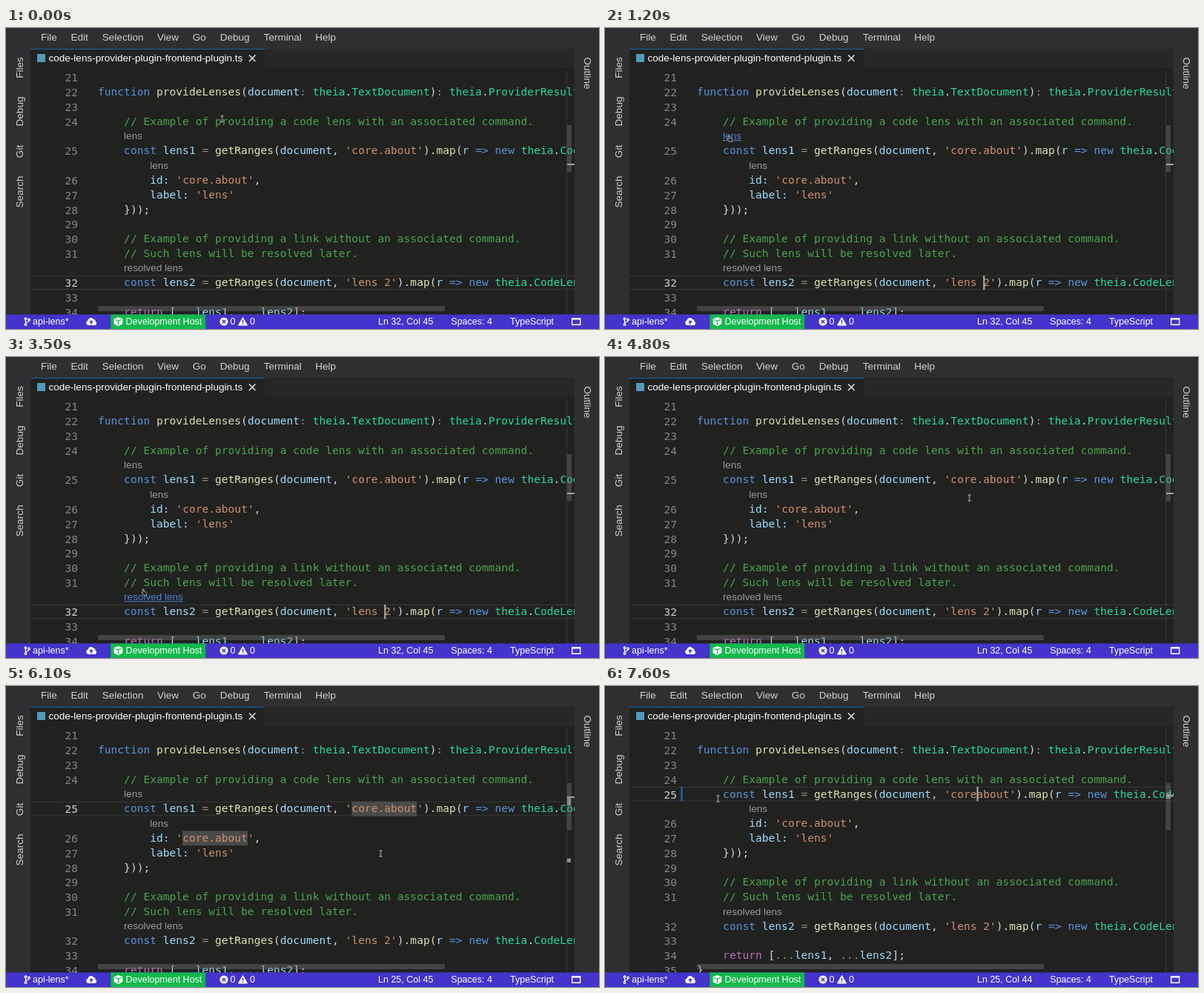
Write an HTML page that moves like this. It is 800 px wide and 406 px high and loops after 8000 ms.

```html
<!DOCTYPE html>
<html lang="en">
<head>
<meta charset="utf-8">
<title>Code lens demo</title>
<style>
html, body { margin: 0; width: 100%; height: 100%; overflow: hidden; background: #2f2e30; }
svg { display: block; width: 800px; height: 406px; }
text { white-space: pre; font: 13.54px "Liberation Sans", Arial, sans-serif; fill: #d2d2d2; }
.code text { font: 14.583px "DejaVu Sans Mono", monospace; fill: #d4d4d4; }
.code .num { fill: #858585; }
.code .lens text { font: 13.54px "Liberation Sans", Arial, sans-serif; fill: currentColor; }
.status text { font-size: 12.5px; fill: #fff; }
.comment { fill: #49a44c; }
.string { fill: #ce8f6e; }
.keyword { fill: #5893dc; }
.control { fill: #bb70c0; }
.type { fill: #26d8a4; }
.func { fill: #dce2b0; }
.dim { fill: #8c8c8c; }
.name { fill: #9cdcfe; }

.lens { color: #999; stroke-opacity: 0; }
.lens line { stroke: currentColor; }

/* 8 s timeline: 68.75% click, 72.5% word highlights, 82.5% deletion, 85% lens removed */
.pre, .mid, .post, .words, .ibeam, .hand, .gone, .collapse, .shift, .lens, .mouse,
.code .on25, .code .on32 { animation: 8s step-end infinite; }
.pre { animation-name: pre; }
.mid { animation-name: mid; }
.post { animation-name: post; }
.words { animation-name: words; }
.gone { animation-name: gone; }
.collapse { animation-name: collapse; }
.shift { animation-name: shift; }
.code .on25 { animation-name: on25; }
.code .on32 { animation-name: on32; }
.ibeam { animation-name: ibeam; }
.hand { animation-name: hand; }
.lensA { animation-name: hoverA; }
.lensB { animation-name: hoverB; }
.lensC { animation-name: hoverC; }
.mouse { animation-name: mouse; animation-timing-function: linear; }
.blink { animation: blink 1s step-end infinite; }
.clicked { animation-delay: -.7s; }
.edited { animation-delay: -.6s; }

@keyframes pre { 0% { opacity: 1 } 68.75%, 100% { opacity: 0 } }
@keyframes mid { 0% { opacity: 0 } 68.75% { opacity: 1 } 82.5%, 100% { opacity: 0 } }
@keyframes post { 0% { opacity: 0 } 82.5%, 100% { opacity: 1 } }
@keyframes words { 0% { opacity: 0 } 72.5% { opacity: 1 } 82.5%, 100% { opacity: 0 } }
@keyframes gone { 0% { opacity: 1 } 85%, 100% { opacity: 0 } }
@keyframes collapse { 0% { transform: none } 85%, 100% { transform: translateY(-19.79px) } }
@keyframes shift { 0% { transform: none } 82.5%, 100% { transform: translateX(-8.78px) } }
@keyframes on25 { 0% { fill: #858585 } 68.75%, 100% { fill: #d0d0d0 } }
@keyframes on32 { 0% { fill: #d0d0d0 } 68.75%, 100% { fill: #858585 } }
@keyframes blink { 0% { opacity: 0 } 20% { opacity: 1 } 70%, 100% { opacity: 0 } }
@keyframes hand {
  0% { opacity: 0 } 10% { opacity: 1 } 18.75% { opacity: 0 } 25% { opacity: 1 }
  38.75% { opacity: 0 } 42.5% { opacity: 1 } 53.75%, 100% { opacity: 0 }
}
@keyframes ibeam {
  0% { opacity: 1 } 10% { opacity: 0 } 18.75% { opacity: 1 } 25% { opacity: 0 }
  38.75% { opacity: 1 } 42.5% { opacity: 0 } 53.75%, 100% { opacity: 1 }
}
@keyframes hoverA { 10% { color: #4f80d8; stroke-opacity: 1 } 18.75%, 100% { color: #999; stroke-opacity: 0 } }
@keyframes hoverB { 25% { color: #4f80d8; stroke-opacity: 1 } 38.75%, 100% { color: #999; stroke-opacity: 0 } }
@keyframes hoverC { 42.5% { color: #4f80d8; stroke-opacity: 1 } 53.75%, 100% { color: #999; stroke-opacity: 0 } }
@keyframes mouse {
  0%, 1.25% { transform: translate(291.5px, 122.5px); animation-timing-function: ease-in-out }
  11.25% { transform: translate(169px, 147px) }
  15%, 17.5% { transform: translate(166.5px, 145px); animation-timing-function: ease-in-out }
  27.5% { transform: translate(201px, 186px) }
  31.25%, 37.5% { transform: translate(199.5px, 184.5px); animation-timing-function: ease-in-out }
  43.75% { transform: translate(184.5px, 313px) }
  50%, 52.5% { transform: translate(187px, 321px); animation-timing-function: ease-in-out }
  56.25%, 58.75% { transform: translate(486px, 195px) }
  60% { transform: translate(491.5px, 190px); animation-timing-function: ease-out }
  68.75%, 71.25% { transform: translate(510px, 167px); animation-timing-function: ease-in-out }
  76.25%, 86.25% { transform: translate(505.5px, 226px); animation-timing-function: ease-in-out }
  92.5%, 100% { transform: translate(152.5px, 152px) }
}
</style>
</head>
<body>
<svg viewBox="0 0 800 406">
  <defs><clipPath id="editor"><rect x="33" y="54" width="734" height="333"/></clipPath></defs>
  <rect width="800" height="406" fill="#2f2e30"/>
  <rect x="33" y="28" width="734" height="26" fill="#272728"/>
  <rect x="33" y="28" width="734" height="359" fill="#212120" clip-path="url(#editor)"/>
  <rect x="33" y="28" width="316" height="27" fill="#212120"/>
  <rect x="33" y="28" width="316" height="1.1" fill="#12659f"/>
  <g id="menu"></g>
  <g id="tabs"></g>
  <rect x="42" y="35" width="11" height="11" fill="#519aba"/>
  <text x="57.5" y="45" style="fill:#fff">code-lens-provider-plugin-frontend-plugin.ts</text>
  <path d="M328 36.5l8.5 8.5M336.5 36.5l-8.5 8.5" stroke="#ddd" stroke-width="1.6"/>

  <g class="code" clip-path="url(#editor)">
    <g id="upper"></g>
    <g id="lower" class="collapse"></g>
    <path d="M756.5 57V386" stroke="#383838"/>
    <rect x="757" y="131" width="6" height="63.5" fill="#797979" fill-opacity=".4"/>
    <rect x="124" y="375" width="468" height="7" fill="#797979" fill-opacity=".4"/>
    <rect class="pre" x="757" y="183" width="10" height="2" fill="#a0a0a0"/>
    <rect class="mid" x="757" y="149" width="10" height="2" fill="#a0a0a0"/>
    <g class="words" fill="#8a8a8a">
      <rect x="757" y="150" width="5" height="11"/>
      <rect x="757" y="232.5" width="5" height="5.5"/>
    </g>
    <g class="post">
      <rect x="757" y="145" width="6" height="7" fill="#8a8a8a"/>
      <rect x="757" y="147" width="10" height="2" fill="#a0a0a0"/>
    </g>
  </g>

  <g class="status">
    <rect y="386.4" width="800" height="20" fill="#4433cc"/>
    <rect x="141.3" y="386.4" width="127.9" height="20" fill="#12b84c"/>
    <g fill="none" stroke="#fff" stroke-width="1.3">
      <circle cx="26.5" cy="392.3" r="1.3"/><circle cx="26.5" cy="400" r="1.3"/><circle cx="31" cy="393.5" r="1.3"/>
      <path d="M26.5 393.6v5M31 394.8c0 2.5-4.5 1.4-4.5 3.8"/>
    </g>
    <path d="M111 401a3.3 3.3 0 0 1-.5-6.4 4.2 4.2 0 0 1 7.8-1.5 2.8 2.8 0 0 1 2.3 3 2.6 2.6 0 0 1-.6 4.9z" fill="#fff"/>
    <path d="M115 400v-4.5M112.8 397.3l2.2-2.2 2.2 2.2" fill="none" stroke="#4433cc" stroke-width="1.4"/>
    <path d="M151.5 390l5.8 2.3v7l-5.8 3-5.8-3v-7z" fill="#fff"/>
    <path d="M147 393.2l4.5 1.8 4.5-1.8M151.5 395v6" fill="none" stroke="#12b84c" stroke-width="1.2"/>
    <circle cx="294" cy="396" r="5.6" fill="#fff"/>
    <path d="M291.8 393.8l4.4 4.4M296.2 393.8l-4.4 4.4" stroke="#4433cc" stroke-width="1.6"/>
    <path d="M319.5 390.5l6 10.5h-12z" fill="#fff" stroke="#fff" stroke-linejoin="round"/>
    <path d="M319.5 393.8v3.6M319.5 398.6v1.5" stroke="#4433cc" stroke-width="1.5"/>
    <path d="M763.7 391.7h11v8.6h-11z" fill="none" stroke="#fff" stroke-width="1.4"/>
    <path d="M763.7 392.3h11" stroke="#fff" stroke-width="2.4"/>
    <g id="status"></g>
    <text class="pre" x="502" y="400.3">Ln 32, Col 45</text>
    <text class="mid" x="502" y="400.3">Ln 25, Col 45</text>
    <text class="post" x="502" y="400.3">Ln 25, Col 44</text>
  </g>

  <g class="mouse">
    <path class="ibeam" d="M-2 -4h4M0 -4v8M-2 4h4" fill="none" stroke="#c4c4c4"/>
    <path class="hand" d="M0 0l1.2.4 1 3 2.3.8.7 1.2-.5 3H1L-1.2 5l.3-.8L.2 4.6z" fill="#1a1a1a" stroke="#d8d8d8" stroke-width=".8"/>
  </g>
</svg>
<script>
const CHAR = 8.78, ROW = 19.79, LEFT = 124;
const col = n => LEFT + n * CHAR;
const rowTop = k => 56.8 + k * ROW;
const baseline = k => 71.4 + k * ROW;
const put = (id, html) => { document.getElementById(id).innerHTML += html; };

const rules = [
  ['comment', /\/\/.*/], ['string', /'[^']*'?|about'|^\.$/], ['name', /\b(?:id|label):/],
  ['keyword', /\b(?:function|const|new)\b|=>/], ['control', /\breturn\b/],
  ['type', /\b(?:theia|TextDocument|ProviderResult|CodeLens)\b/],
  ['func', /\b(?:provideLenses|getRanges|map)\b/], ['dim', /\.\.\.|[:=]/], ['name', /\w+/]
];
const tokens = new RegExp(rules.map(([, r]) => `(${r.source})`).join('|'), 'g');
const highlight = s => s.replace(tokens, (m, ...groups) =>
  `<tspan class="${rules[groups.findIndex((g, i) => i < rules.length && g !== undefined)][0]}">${m}</tspan>`);

const code = (k, indent, s, cls = '') =>
  `<text class="${cls}" x="${col(indent)}" y="${baseline(k)}">${highlight(s)}</text>`;
const number = (k, n) => `<text class="num on${n}" x="79.4" y="${baseline(k) + 1}">${n}</text>`;
const line = (k, n, indent = 0, s = '') => number(k, n) + code(k, indent, s);
const lens = (k, indent, label, width, cls) =>
  `<g class="lens ${cls}"><text x="${col(indent)}" y="${baseline(k) - .2}">${label}</text>` +
  `<line x1="${col(indent)}" x2="${col(indent) + width}" y1="${baseline(k) + 1.2}" y2="${baseline(k) + 1.2}"/></g>`;
const current = k =>
  `<path d="M33 ${rowTop(k) + .5}H767M33 ${rowTop(k) + ROW - 1}H767" stroke="#303030" stroke-width="1.6"/>`;
const caret = (k, n, cls) =>
  `<rect class="blink ${cls}" x="${col(n)}" y="${rowTop(k)}" width="2" height="19.5" fill="#b4b4b0"/>`;
const word = (k, n) =>
  `<rect x="${col(n)}" y="${rowTop(k)}" width="${10 * CHAR}" height="${ROW}" fill="#4a4a4a"/>`;

put('upper',
  line(0, 21) +
  line(1, 22, 0, 'function provideLenses(document: theia.TextDocument): theia.ProviderResult') +
  line(2, 23) +
  line(3, 24, 4, '// Example of providing a code lens with an associated command.') +
  `<g class="gone">${lens(4, 4, 'lens', 24.8, 'lensA')}</g>`);

put('lower',
  `<g class="pre">${current(14)}</g><g class="mid">${current(5)}</g><g class="post">${current(5)}` +
  `<rect x="102" y="${rowTop(5)}" width="3" height="${ROW}" fill="#1b5c96"/></g>` +
  `<g class="words">${word(5, 39)}${word(7, 13)}</g>` +
  number(5, 25) +
  code(5, 4, "const lens1 = getRanges(document, 'core") +
  `<g class="pre">${code(5, 43, '.')}</g><g class="mid">${code(5, 43, '.')}</g>` +
  code(5, 44, "about').map(r => new theia.CodeLens(r, {", 'shift') +
  lens(6, 8, 'lens', 24.8, 'lensB') +
  line(7, 26, 8, "id: 'core.about',") +
  line(8, 27, 8, "label: 'lens'") +
  line(9, 28, 4, '}));') +
  line(10, 29) +
  line(11, 30, 4, '// Example of providing a link without an associated command.') +
  line(12, 31, 4, '// Such lens will be resolved later.') +
  lens(13, 4, 'resolved lens', 79.8, 'lensC') +
  line(14, 32, 4, "const lens2 = getRanges(document, 'lens 2').map(r => new theia.CodeLens(r));") +
  line(15, 33) +
  line(16, 34, 4, 'return [...lens1, ...lens2];') +
  line(17, 35, 0, '}') +
  `<g class="pre">${caret(14, 44, '')}</g>` +
  `<g class="mid">${caret(5, 44, 'clicked')}</g><g class="post">${caret(5, 43, 'edited')}</g>`);

const labels = (id, y, items) =>
  put(id, items.map(([x, s]) => `<text x="${x}" y="${y}">${s}</text>`).join(''));
labels('menu', 17, [[47, 'File'], [87.5, 'Edit'], [129.8, 'Selection'], [204, 'View'],
  [251.8, 'Go'], [288.7, 'Debug'], [347.7, 'Terminal'], [417.3, 'Help']]);
labels('status', 400.3, [[36, 'api-lens*'], [161.5, 'Development Host'], [302.5, '0'], [329, '0'],
  [600.3, 'Spaces: 4'], [680, 'TypeScript']]);

const sideTab = (x, y, angle, s) =>
  `<text text-anchor="middle" transform="translate(${x} ${y}) rotate(${angle})">${s}</text>`;
put('tabs',
  sideTab(22.5, 53.5, -90, 'Files') + sideTab(22.5, 112.5, -90, 'Debug') +
  sideTab(22.5, 166.5, -90, 'Git') + sideTab(22.5, 221, -90, 'Search') +
  sideTab(780, 61, 90, 'Outline'));
</script>
</body>
</html>
```
